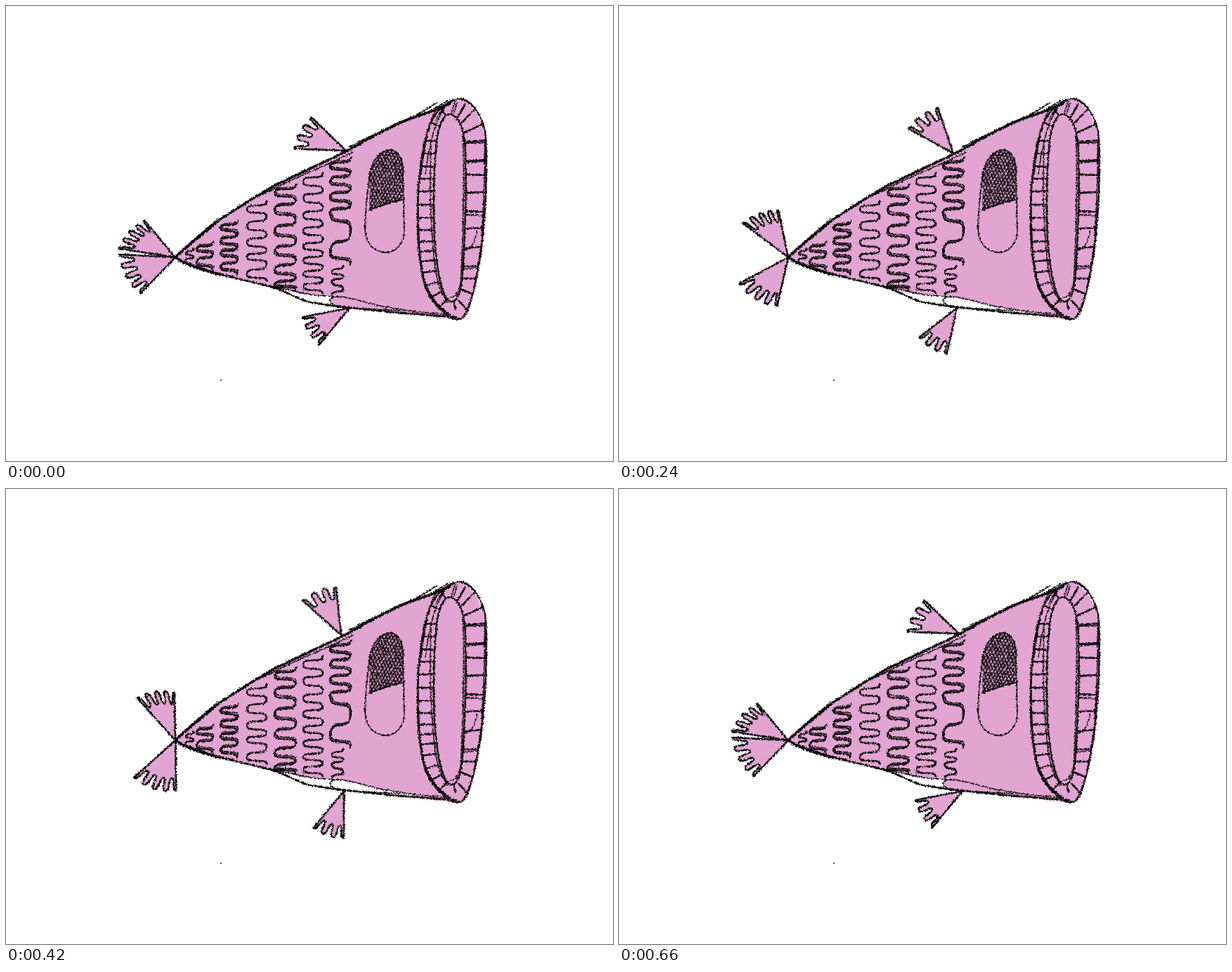
An HTML page that plays this animation: 864 by 648 pixels, repeating every 720 ms.

```html
<!DOCTYPE html>
<html lang="en">
<head>
<meta charset="utf-8">
<title>Paddling fish</title>
<style>
  html, body { margin: 0; width: 100%; height: 100%; overflow: hidden; background: #fff; }
  svg { display: block; width: 864px; height: 648px; }
  .pink { fill: #e2a5d2; }
  .ink { fill: none; stroke: #0a0709; stroke-width: 2.5; stroke-linecap: round; stroke-linejoin: round; }
  .thin { stroke-width: 1.5; }
  .bold { stroke-width: 3.6; }
</style>
</head>
<body>
<svg viewBox="0 0 864 648">
  <defs>
    <filter id="crayon" filterUnits="userSpaceOnUse" x="0" y="0" width="864" height="648" color-interpolation-filters="sRGB">
      <feTurbulence type="fractalNoise" baseFrequency=".45" numOctaves="2" seed="4"/>
      <feDisplacementMap in="SourceGraphic" scale="4.5" xChannelSelector="R" yChannelSelector="G"/>
    </filter>
    <pattern id="hatch" width="5" height="9" patternUnits="userSpaceOnUse" patternTransform="rotate(6)">
      <path class="ink" style="stroke-width:1.8" d="M0 0L5 9M5 0L0 9"/>
    </pattern>
  </defs>
  <g filter="url(#crayon)">
    <g id="fins"></g>

    <path class="pink" d="M241 358C265 335 330 285 380 257C420 236 450 224 484 207C520 188 560 163 600 152L645 132
      C668 140 684 170 684 215C685 260 680 320 673 370C668 405 660 446 645 447L560 438L480 430C440 424 420 415 385 402
      C340 392 285 382 241 358Z"/>
    <path id="gap" fill="#fff"/>
    <path fill="#fff" d="M262 371Q295 384 335 391Q295 378 262 371Z"/>

    <!-- body edges -->
    <path class="ink bold" d="M241 358C262 337 285 322 303 305C330 288 360 268 380 257C420 237 450 224 484 207
      C520 187 560 163 600 152L632 139"/>
    <path class="ink thin" d="M252 346L300 304M285 318C330 285 350 275 378 262C420 240 455 228 494 208M488 201Q540 174 585 155
      L613 138M600 152L630 134"/>
    <path class="ink" d="M241 358C285 380 340 390 385 402C400 408 415 417 430 421C460 428 520 433 560 437L640 443"/>
    <path class="ink bold" d="M246 362Q275 377 322 386"/>
    <path class="ink thin" d="M275 373Q340 392 410 406Q440 414 478 414C500 417 520 426 550 430Q580 436 625 439
      M472 414Q461 414 461 420Q463 426 476 429L560 434"/>

    <!-- rim -->
    <path class="ink" d="M648 132C668 138 682 165 683 190C685 230 683 280 680 310C678 350 668 400 660 425
      C655 442 650 447 640 446C625 443 604 420 597 400C588 370 585 330 586 280C588 235 594 195 603 170
      C612 148 628 133 648 132"/>
    <path class="ink thin" d="M681 190C683 240 679 300 676 345C670 385 663 425 652 440M630 137C612 158 602 195 597 240
      M612 148C600 170 595 205 591 240M636 136Q620 143 611 165"/>
    <path class="ink" d="M632 154C648 157 654 185 654 215C656 270 653 330 650 380C648 410 642 421 634 421
      C620 418 613 375 610 330C608 280 609 225 614 185C618 165 624 154 632 154Z"/>
    <path class="ink thin" d="M650 180C653 220 651 330 647 395Q642 416 633 415M605 200C602 270 606 340 612 380Q618 412 630 422"/>
    <path class="ink" d="M587 250C585 310 588 360 595 390Q605 422 632 440"/>
    <path class="ink" d="M655 194L683 191M656 221L684 219M656 240L684 241M656 266L683 265M655 292L681 293M655 317L680 316
      M653 345L677 343M652 371L672 370M651 388L670 388M649 404L664 410M644 419L655 432M637 422L640 432"/>
    <path class="ink thin" d="M655 196L683 194M656 223L684 221M655 297L681 299M653 347Q664 350 671 320M652 374L672 373
      M634 154L639 136M637 155L642 137"/>
    <path class="ink" d="M643 158L654 139M649 166L666 148M653 180L679 168M626 157L619 146M618 172L606 166
      M613 192L598 192M611 210L594 210M609 229L591 228M608 246L588 246M607 264L587 264M607 283L586 283M607 301L586 302
      M608 319L587 319M608 335L588 336M609 349L588 350M610 362L590 364M612 377L592 380M615 393L597 398M620 407L604 415
      M627 418L616 430"/>

    <!-- pocket -->
    <path fill="url(#hatch)" d="M518 240C522 215 535 205 548 205C562 207 567 225 565 245L564 276L517 291Z"/>
    <path class="ink" style="stroke-width:1.8" d="M518 240C522 215 535 205 548 205C562 207 567 225 565 245L567 325C563 345 550 352 538 351
      C520 348 511 335 511 315C512 290 514 265 518 240M517 291Q540 281 564 276"/>

    <path id="scales" class="ink"/>
    <path id="scales2" class="ink thin" transform="translate(1.5 -2.5)"/>
  </g>
  <circle cx="306" cy="533" r="1" fill="#111"/>
</svg>
<script>
const $ = id => document.getElementById(id);

// Rounded zigzag between hi and lo, turning at each stop
function meander(lo, hi, stops, map = (u, v) => [u, v]) {
  const at = (u, v) => map(u, v).map(n => n.toFixed(1)).join(' ');
  let d = at(hi, stops[0]);
  for (let i = 1; i < stops.length; i++) {
    const [a, b] = i % 2 ? [hi, lo] : [lo, hi];
    const p = stops[i - 1], q = stops[i], h = q - p;
    d += `C${at(a, p + h * .95)} ${at(b, q - h * .95)} ${at(b, q)}`;
  }
  return d;
}

const columns = [
  [256, 267, 346, 352, 357, 362],
  [271, 294, 337, 347, 354, 365, 376],
  [305, 329, 308, 316, 325, 335, 345, 352, 362, 372, 382],
  [343, 371, 278, 290, 299, 314, 325, 337, 348, 357, 367, 383, 391],
  [382, 412, 256, 266, 277, 290, 305, 321, 335, 350, 362, 377, 388, 397, 404],
  [423, 451, 238, 250, 262, 273, 287, 298, 310, 320, 332, 343, 352, 363, 372, 382, 390, 400, 409],
  [461, 490, 217, 229, 238, 250, 261, 272, 285, 294, 320, 353, 368],
  [464, 480, 370, 379, 385, 393, 403, 411]
];
const wiggles = columns.map(([lo, hi, ...ys]) => 'M' + meander(lo, hi, ys));
$('scales').setAttribute('d', wiggles.join(''));
$('scales2').setAttribute('d', [1, 2, 4, 6].map(i => wiggles[i]).join(''));

// from/to: edge angles in degrees above the left horizontal; r: edge lengths
// turn, x, y: one value per pose; flip -1 mirrors downward
const fins = [
  { from: 9, to: 50, r: [80, 67], fingers: 5, flip: 1,
    turn: [0, 7, 17, 28, 39, 49], x: Array(6).fill(241), y: Array(6).fill(358) },
  { from: -3, to: 46, r: [78, 70], fingers: 5, flip: -1,
    turn: [0, 12, 21, 31, 45, 54], x: Array(6).fill(241), y: Array(6).fill(358) },
  { from: 2, to: 44, r: [72, 67], fingers: 4, flip: 1,
    turn: [0, 14.5, 21, 27, 40, 52], x: [484, 469, 473, 476, 477, 478], y: [206, 211, 210, 210, 208, 207] },
  { from: 11, to: 50.5, r: [67, 66], fingers: 4, flip: -1,
    turn: [0, 10, 18, 27, 39.5, 50], x: [489, 484, 482, 481, 481, 481], y: [430, 431, 431, 430, 430, 430] }
];

function finPath({ from, to, r, fingers }) {
  const n = fingers * 2 - 2;
  const stops = Array.from({ length: n + 1 }, (_, i) => i / n);
  const polar = (k, v) => {
    const a = (from + (to - from) * v) * Math.PI / 180;
    const len = k * (r[0] + (r[1] - r[0]) * v);
    return [-len * Math.cos(a), -len * Math.sin(a)];
  };
  return 'M0 0L' + meander(.76, 1.02, stops, polar) + 'Z';
}

for (const fin of fins) {
  fin.el = document.createElementNS('http://www.w3.org/2000/svg', 'path');
  fin.el.setAttribute('d', finPath(fin));
  fin.el.setAttribute('class', 'ink');
  fin.el.style.fill = '#e2a5d2';
  $('fins').append(fin.el);
}

const gaps = [
  'M388 402Q425 413 462 414Q462 424 476 428L556 434Q520 433 470 428Q430 422 388 402Z',
  'M388 402Q425 413 475 414Q515 424 540 429L605 438L560 437Q500 433 470 428Q430 422 388 402Z'
];

let shown = -1;
function frame() {
  const step = Math.max(0, Math.floor(performance.now() % 720 / 60) - 1);
  const pose = Math.min(step, 10 - step);
  if (pose !== shown) {
    shown = pose;
    for (const { el, x, y, turn, flip } of fins)
      el.setAttribute('transform', `translate(${x[pose]} ${y[pose]}) scale(1 ${flip}) rotate(${turn[pose]})`);
    $('gap').setAttribute('d', gaps[pose ? 1 : 0]);
  }
  requestAnimationFrame(frame);
}
frame();
</script>
</body>
</html>
```
